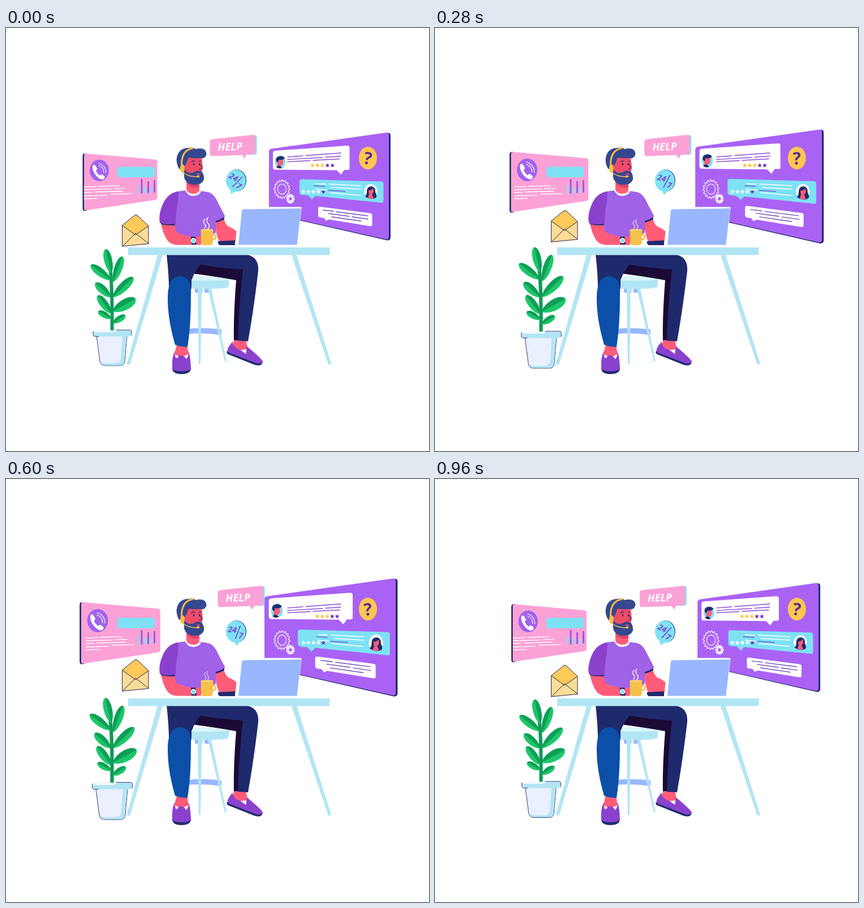
Write an HTML page that moves like this. It is 748 px wide and 748 px high and loops after 1 s.

```html
<!DOCTYPE html>
<html lang="en">
<head>
<meta charset="utf-8">
<title>Help desk</title>
<style>
  html, body { margin: 0; width: 100%; height: 100%; overflow: hidden; background: #fff; }
  svg { display: block; width: 100vw; height: 100vh; }
  text { font-family: "Open Sans", "Noto Sans", sans-serif; font-weight: 700; text-anchor: middle; }
  .ink { fill: #1f2a6d; }
  .skin { fill: #ff5c78; }
  .hair { fill: #35488f; }
  .ice { fill: #b2e5f4; }
  .violet { fill: #8a42ce; }
  .line { fill: none; stroke-linecap: round; stroke-linejoin: round; }
</style>
</head>
<body>
<svg viewBox="0 0 748 748" xmlns="http://www.w3.org/2000/svg">
  <!-- contact card -->
  <g id="contact">
    <path class="ink" d="M139 222L143 222V323L139 323.500Q135.500 323.500 135.500 319V226Q135.500 222 139 222Z"/>
    <path fill="#fca1d6" d="M141 222L264 232.500Q267.500 233 267.500 237V300Q267.500 303.500 264 304L141 322.500Q138 323 138 319V226Q138 222 141 222Z"/>
    <ellipse cx="165" cy="252" rx="17" ry="19" fill="#a062ee"/>
    <path fill="#fff" d="M153 244Q155 240 158 243L161 248Q162 250 159 252Q161 258 166 261Q168 258 170 259L174 262Q176 264 173 267Q168 270 160 262Q152 253 153 244Z"/>
    <path class="line" stroke="#fff" stroke-width="1.200" d="M164 239Q176 242 177 256M164 243Q173 246 173 256"/>
  </g>
  <rect x="197" y="245.500" width="66.500" height="18.500" rx="4" fill="#7ee2f4"/>
  <g id="bars"></g>
  <g id="notes" class="line" stroke="#fff" stroke-width="1.300"></g>

  <!-- reviews board -->
  <g id="board">
    <path class="ink" d="M470 215L675 185.500Q680 185 680 190V370Q680 376 674 375.500L470 329Z"/>
    <path fill="#aa62f5" d="M470 213.500L672 185Q677 184.500 677 189.500V369Q677 375 671 373.500L469 328Q465 327 465 323V219Q465 214 470 213.500Z"/>
    <path fill="#fff" d="M476 217L603 208Q607.500 208 607.500 212V248Q607.500 251 604 251L598 251L592.500 259L585 251.500L476 250.500Q472 250.500 472 246V221Q472 217.500 476 217Z"/>
    <path fill="#7ee2f4" d="M523 267.500L664 271.500Q667.500 272 667.500 275V306Q667.500 309.500 664 309L547 297L541 303L534 296L523 295Q519 294 519 291V271Q519 267.500 523 267.500Z"/>
    <ellipse cx="485" cy="237" rx="9.500" ry="11.500" fill="#7ee2f4"/>
    <path class="skin" d="M480 231H490V240Q488 244 486 243V247Q483 248 480 246Z"/>
    <path class="ink" d="M478 236Q476 228 483 227Q489 225 493 230Q490 234 482 233L481 238ZM478 246Q481 242 485 244L488 247Q483 250 478 246Z"/>
    <ellipse cx="645" cy="289" rx="11.500" ry="13" fill="#fff"/>
    <path class="ink" d="M638 290Q638 280 646 280Q654 281 653 290Q658 300 652 301Q643 304 637 299Q635 299 635 297Q638 296 638 290Z"/>
    <path class="skin" d="M641 287Q646 288 649 283Q652 291 647 294L650 300Q645 304 640 300L642 294Z"/>
  </g>
  <g id="reply">
    <path fill="#fff" d="M555 316L644 327.500Q647.500 328 647.500 331V347Q647.500 351 644 350.500L571 338.500L566 341L562 336L555 335Q552 334 552 331V319Q552 315.500 555 316Z"/>
    <path class="line" stroke="#7545ba" stroke-width="1.300" d="M561 322L579 324M584 325L639 332M570 328L607 333M612 334L640 338M576 334L628 341.500"/>
  </g>
  <path class="line" stroke="#8a4bd3" stroke-width="1.300" d="M498 228L525 226M530 225.500L592 221M498 232.500L560 229M565 228.500L592 226.500M498 236.500L538 234.500M543 234L590 231.500"/>
  <g id="rating"></g>
  <g id="score"></g>
  <g id="replyLines" class="line" stroke-width="1.400">
    <path stroke="#fff" d="M548 275.500L565 276M571 276L628 279M576 282L628 285M548 285L567 287M572 291L627 296"/>
    <path stroke="#6d5bd0" d="M545 279L564 280M570 287L600 289"/>
  </g>
  <ellipse cx="640" cy="230" rx="16" ry="20" fill="#ffc64f"/>
  <text id="ask" x="640" y="241" font-size="30" fill="#54308f">?</text>
  <g id="gears" fill="none" stroke="#fff" stroke-linejoin="round"></g>

  <!-- speech bubbles -->
  <g id="help">
    <path fill="#7ee2f4" d="M368 197L439 189.500Q443.500 189 443.500 193V220Q443.500 224 438 224L368 226Z"/>
    <path fill="#fca1d6" d="M365 196.500L436 189Q441 189 441 193V219Q441 223.500 437 223.500L425 224L422 231L417 224.500L365 226.500Q360.500 227 360.500 222V201Q360.500 197 365 196.500Z"/>
    <text x="396" y="216.500" font-size="18.500" font-style="italic" fill="#fff" transform="rotate(-2 396 210)">HELP</text>
  </g>
  <ellipse cx="407.500" cy="269.700" rx="17.500" ry="19.500" fill="#1f2a6d"/>
  <ellipse cx="406.500" cy="270" rx="17.500" ry="19.500" fill="#7ee2f4"/>
  <g id="hours" font-size="14" font-style="italic" fill="#7747c8">
    <path fill="#7ee2f4" d="M404 287L411 295L416 285Z"/>
    <text x="400" y="272">24</text>
    <path class="line" stroke="#7747c8" stroke-width="1.700" d="M413 259L407 282"/>
    <text x="416" y="281">7</text>
  </g>

  <!-- envelope -->
  <g id="mail" stroke="#26264f" stroke-linejoin="round">
    <path fill="#fbdc96" d="M205.500 349V386L252 381.500V350Z"/>
    <path fill="#ffc95a" d="M205.500 349L227 331.500Q230 329 233 332L252 350L229 366Z"/>
    <path fill="none" d="M206 386L229 363L252 381"/>
  </g>

  <!-- plant -->
  <g id="plant">
    <path class="line" stroke="#0e9a55" stroke-width="6" stroke-linecap="butt" d="M184 425Q188 450 187.500 536"/>
    <g id="leaves"></g>
    <path fill="#eaf0ff" stroke="#26306f" stroke-width=".9" d="M160 544L166 589Q167 597 175 597H202Q209 597 210 589L214 544Z"/>
    <path class="ice" d="M206 545H213.500L209.500 588Q208.500 596.500 202 596.500H175Q169 596.500 167 591Q171 593 177 593H194Q202 593 203 585Z"/>
    <path class="ice" d="M154 537Q154 534.500 157 534.500H220Q222 534.500 222 537V543Q222 545.500 219 545.500H157Q154 545.500 154 542Z"/>
    <path fill="#fff" d="M156 535H195Q194 538 190 538H157Z"/>
    <path class="line" stroke="#26306f" stroke-width=".9" d="M154 537V542Q154 545.500 158 545.500H164M195 534H219Q222 534 222 537V543"/>
  </g>

  <!-- stool -->
  <path fill="#98b7fe" d="M321 532Q350 529 381 533V543Q350 538 321 541ZM334 460H347V468H334ZM351 460H363V468H351Z"/>
  <path class="ice" d="M339 461H346L344 594H341ZM357 461L363 461L390 589L387 590Z"/>
  <path class="ice" d="M318 441H394V455Q394 459 386 460Q350 463 318 460Z"/>
  <path fill="#d8f4fa" d="M318 440Q360 437 394 442Q394 446 385 446Q350 448 318 446Z"/>

  <!-- legs and shoes -->
  <path fill="#1a0a35" d="M330 418H432L420 553H403Q402 510 407 446Q375 440 329 434Z"/>
  <path class="skin" d="M404 552H424L428 568L411 570L400 562ZM302 560H320L323 579L310 588L297 579Z"/>
  <path class="ink" d="M284 400H420Q448 402 446 430Q438 498 428 554L410 553Q411 500 419 427Q370 424 344 418Q334 430 328 446Q329 475 318 480L288 475Q289 445 284 400Z"/>
  <path fill="#0b4fa9" d="M286 474Q287 439 308 439Q329 440 327 474Q327 525 321 564Q309 564 299 560Q285 512 286 474Z"/>
  <path class="ink" d="M294 600H327Q328 612 310 612Q293 612 294 600ZM391 571L453 589Q455 593 450 596Q446 598 438 595L393 577Q389 575 391 571Z"/>
  <path class="violet" d="M299 571Q296 579 301 584Q307 576 313 580L319 585Q324 579 322 571Q326 577 327 602Q325 607 310 607Q296 607 294 602Q293 580 299 571ZM401 554Q400 565 414 569L424 576L426 563Q447 580 454 589Q454 594 443 593L394 574Q389 570 395 562Z"/>
  <path fill="#fff" d="M298 577L303 584L305 580ZM323 577L319 585L315 580ZM425 568L424 576L419 572Z"/>

  <!-- desk -->
  <path class="ice" d="M268.500 400H277.500L220 593Q218 597 213.500 594ZM504.500 400H513.500L575 593Q573 597 569.500 594Z"/>

  <!-- agent -->
  <path class="skin" d="M274 343Q276 361 285 375Q291 383 302 383.500H345V369L314 366Q304 364 299 343ZM370 338L385 335Q387 346 393 351Q402 354 409 361V379H378Q370 365 370 338Z"/>
  <path class="ink" d="M274 343L300 345V348.500Q286 350 274 347ZM370 339L386 334V338Q378 343 370 344Z"/>
  <path fill="#a062e6" d="M300 290Q318 285 344 288L359 290.500Q369 294 376 311L387.500 333Q380 339 371 341V362Q360 370 335 369Q315 369 300 360L296 320Z"/>
  <path class="violet" d="M305 289Q286 291 277 312Q269 330 272 345Q285 349 300 346Q300 325 304 308Z"/>
  <path fill="#fff" d="M317 287Q321 297 332 297Q343 296 345 288L340 285H320Z"/>
  <path class="skin" d="M319 265H342V287Q340 293 331 293Q322 293 319 286Z"/>
  <path fill="#e63f63" d="M321 273Q331 281 342 277V281Q329 285 321 276Z"/>
  <path class="hair" d="M306 249Q299 236 303 225Q308 212 323 212Q331 210 335 214Q353 210 354.500 222Q354 231 343 231L325 233L317 251Z"/>
  <path fill="#f04c68" d="M322 230Q332 226 346 230L348 245L346 258Q334 264 319 257L315 245Q320 240 322 230Z"/>
  <path class="hair" d="M314 245Q316 253 323 256Q331 257 335 253Q342 251 347 255Q351 261 350 268Q346 278 332 277.500Q318 276 315 264Z"/>
  <path class="hair" d="M313 224Q323 232 343 230Q352 229 354 221L333 214Z"/>
  <path class="line" stroke="#1f2a6d" stroke-width="1.200" d="M328 237Q331 234 334 236M341 236L345 235M343 241L347 248L342 250"/>
  <g class="ink"><ellipse cx="332" cy="241" rx="1.300" ry="2"/><ellipse cx="342" cy="241" rx="1.200" ry="2"/></g>
  <path fill="#e63f63" d="M336 258Q340 256 344 258L340 261Z"/>
  <path class="line" stroke="#f9bd45" stroke-width="3" d="M310.500 243Q310 216 330 212.500"/>
  <ellipse cx="312" cy="248.500" rx="4" ry="7.500" fill="#f9bd45"/>
  <path class="line" stroke="#f9bd45" stroke-width="1.400" d="M313 255Q321 263 338 263"/>
  <ellipse cx="339.500" cy="262.500" rx="3" ry="1.800" fill="#f9bd45"/>
  <path class="ink" d="M327 369H335L337 383H328ZM375 377L405 375.500V384H378Q374 382 375 377Z"/>
  <circle cx="331.500" cy="376" r="4" fill="#7ee2f4" stroke="#fff" stroke-width="1.300"/>

  <!-- laptop, table top, mug -->
  <path fill="#fff" d="M415 316.500H521Q523 316.500 522.500 319L515 384.500H405L412 319Z"/>
  <path fill="#98b7fe" d="M420 320.500L520 319Q522 319 521.500 322L514.500 383.500H411L417 323Q417.500 320.500 420 320.500Z"/>
  <rect class="ice" x="216" y="388" width="356.500" height="13.500"/>
  <g id="steam"><path class="line" stroke="#fff" stroke-width="1.500" d="M351 354Q355 350 351 346Q347 342 352 338M357 355Q362 350 357 345Q353 341 357 335"/></g>
  <circle cx="367" cy="369.500" r="4" fill="none" stroke="#f4b83f" stroke-width="2.500"/>
  <path fill="#f7c04a" d="M344.500 357H366.500L365.500 380Q365 384 360 384H350Q345.500 384 345 379Z"/>
  <ellipse cx="355.500" cy="357" rx="11" ry="1.600" fill="#ffd778"/>
</svg>
<script>
const LOOP = 1000, STEP = 40;
const $ = id => document.getElementById(id);
const range = n => [...Array(n).keys()];
const polar = (r, a) => `${r * Math.cos(a)},${r * Math.sin(a)}`;

// A rounded leaf with its shaded half facing the top of the stem.
function leaf([x, y, tx, ty, w]) {
  const dx = tx - x, dy = ty - y, len = Math.hypot(dx, dy);
  const at = (u, v) => `${x + dx * u - dy / len * v} ${y + dy * u + dx / len * v}`;
  const side = v => `C${at(.2, v)} ${at(.95, v * 1.1)} ${tx} ${ty}`;
  const back = v => `C${at(.95, v * 1.1)} ${at(.2, v)} ${x} ${y}Z`;
  return `<path fill="#1dc66a" d="M${x} ${y}${side(w)}${back(-w)}"/>` +
    `<path fill="#0e9f57" d="M${x} ${y}${side(tx < x ? w : -w)}Z"/>`;
}

function star(x, y, color) {
  const pts = range(10).map(i => polar(i % 2 ? 1.9 : 4.2, i * Math.PI / 5 - Math.PI / 2));
  return `<polygon points="${pts.join(' ')}" fill="${color}" transform="translate(${x} ${y})"/>`;
}

const stars = (x, y, gap, lit, color) =>
  range(5).map(i => star(x + i * gap, y, i < lit ? color : '#6a35b5')).join('');

function gear(id, x, y, rx, ry, teeth, width) {
  const pts = range(teeth * 4).map(i =>
    polar(i % 4 < 2 ? rx : rx * .84, i * Math.PI / teeth / 2));
  return `<g transform="translate(${x} ${y}) scale(1 ${ry / rx})" stroke-width="${width}">` +
    `<g id="${id}"><polygon points="${pts.join(' ')}"/><circle r="${rx * .55}"/></g></g>`;
}

$('leaves').innerHTML = [
  [186, 434, 176, 391, 9], [190, 449, 206, 404, 9], [185, 446, 150, 419, 9],
  [189, 476, 225, 441, 10], [185, 476, 158, 451, 9], [189, 501, 229, 479, 12],
  [186, 505, 162, 473, 9], [186, 514, 163, 501, 7], [189, 522, 211, 508, 7]
].map(leaf).join('');

$('bars').innerHTML = [[233, 278], [238.5, 267], [244.5, 281], [250, 271], [255.5, 282], [261, 269]]
  .map(([x, y], i) => `<path d="M${x} ${y}h3V${293 - i * .4}h-3Z" fill="${i % 2 ? '#9a5be0' : '#7ee2f4'}"/>`).join('');

$('notes').innerHTML = [
  [138, 281, 159], [163, 280, 201], [138, 286, 186], [191, 284, 210], [138, 291, 152],
  [157, 290, 207], [138, 297, 178], [184, 294, 222], [138, 302, 161]
].map(([x, y, end]) => `<path d="M${x} ${y}L${end} ${y - (end - x) * .03}"/>`).join('');

$('rating').innerHTML = stars(542, 243, 8.8, 3, '#ffc43f');
$('score').innerHTML = stars(526, 289.5, 8.8, 4, '#fff');
$('gears').innerHTML = gear('bigGear', 488, 285, 14, 16.5, 16, 1.1) +
  gear('smallGear', 503, 302, 6.5, 7.5, 10, 1.8);

const tri = (t, peak) => t < peak ? t / peak : (LOOP - t) / (LOOP - peak);
const put = (id, value) => $(id).setAttribute('transform', value);
const move = (id, x, y) => put(id, `translate(${x} ${y})`);
const turn = (id, a, x = 0, y = 0) => put(id, `rotate(${a} ${x} ${y})`);
const zoom = (id, s, x, y) =>
  put(id, `translate(${x} ${y}) scale(${s}) translate(${-x} ${-y})`);

function draw(t) {
  const p = tri(t, 500), q = tri(t, 540);
  const swell = Math.pow(Math.sin(Math.PI * t / LOOP), .6);
  zoom('contact', 1 + .1 * p, 201.5, 272);
  move('notes', 5 * p, 0);
  zoom('board', 1 + .109 * q, 549, 280);
  zoom('reply', 1 + .15 * p, 596, 333);
  move('rating', 10.5 * p, 0);
  move('replyLines', 5 * p, 0);
  move('help', 17.5 * p, 0);
  move('mail', 0, -13.75 * p);
  turn('hours', 30 - 30 * p, 407, 270);
  turn('ask', 10 - 20 * p, 640, 230);
  turn('bigGear', 30 * p);
  turn('smallGear', -30 * p);
  zoom('plant', 1 + .046 * swell, 188.5, 478);
  zoom('steam', 1 - .3 * p, 355, 356);
  $('steam').setAttribute('opacity', 1 - .4 * p);
}

function tick(now) {
  draw(Math.floor(now % LOOP / STEP) * STEP);
  requestAnimationFrame(tick);
}
draw(0);
requestAnimationFrame(tick);
</script>
</body>
</html>
```
